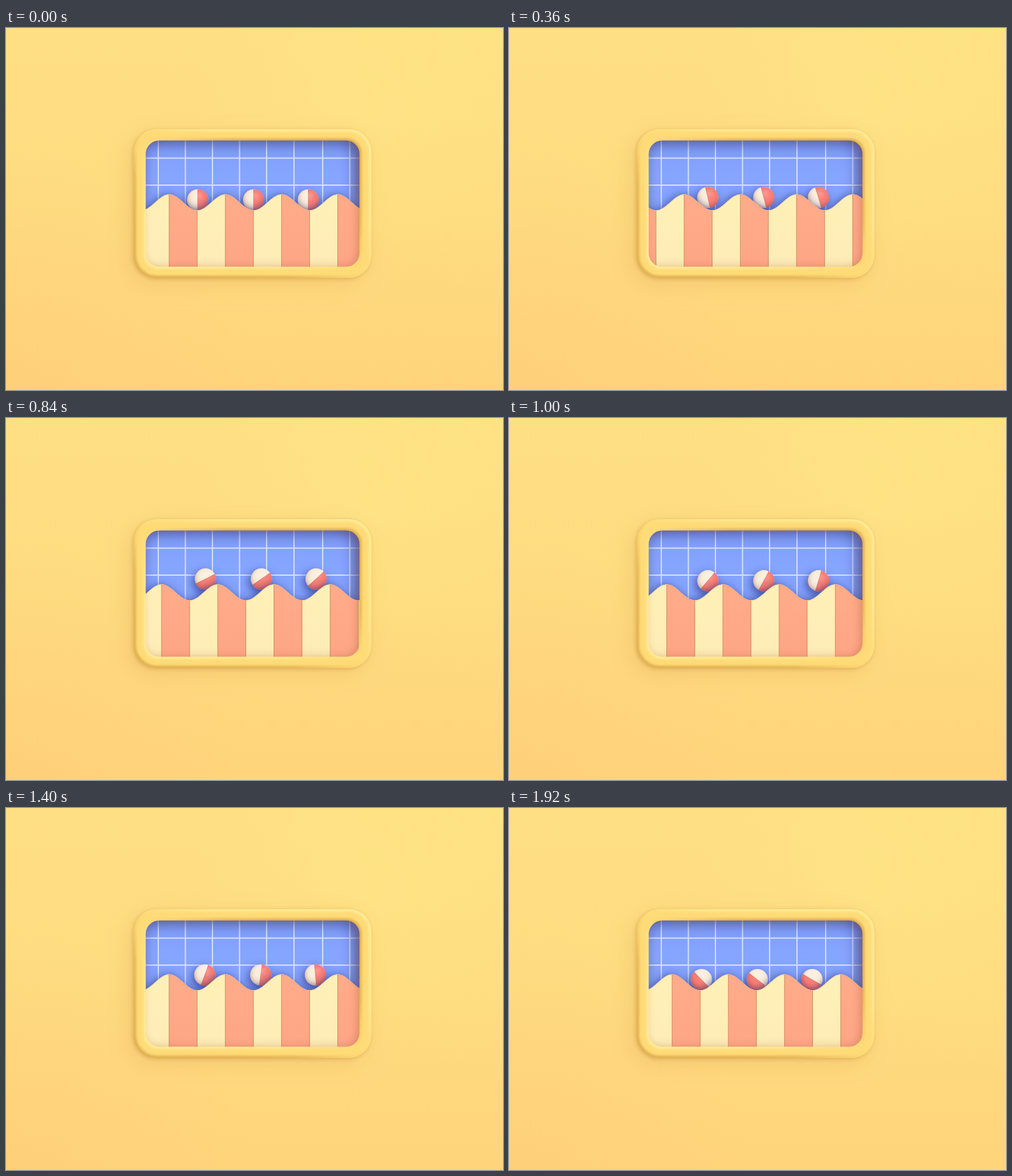
Write an HTML page with a canvas that moves like this. It is 780 px wide and 569 px high and loops after 1.96 s.

```html
<!DOCTYPE html>
<html lang="en">
<head>
<meta charset="utf-8">
<title>Rolling balls on a wave</title>
<style>
html, body { margin: 0; width: 100%; height: 100%; overflow: hidden; background: #fedb80; }
canvas { display: block; }
</style>
</head>
<body>
<canvas id="stage" width="780" height="569"></canvas>
<script>
const W = 780, H = 569, LOOP = 1960, STEP = 40;
const PERIOD = 88.2, CREST = 256, MID = 274, AMP = 12.5, R = 16.7;
const CONTACT_R = 15.2;
const BOX = { x: 218.5, y: 176, w: 337, h: 200, r: 22 };
const TUBE = 17.7;
const BALL_GAP = [0, 87.8, 173.6];
const GRID_X = [239, 281.5, 324, 366.5, 409, 452, 497, 539.5];
const GRID_Y = [204.5, 247];

// [time, value]
const SHIFT = [[0, 0], [320, 20], [650, -12.8], [720, -12.8], [1430, 0], [1920, -PERIOD]];
const BALL_X = [[0, 300.8], [360, 312], [560, 310.7], [840, 313], [1160, 311], [1400, 312], [1640, 316], [1920, 302]];
const SPIN = [[0, 0], [360, -13], [560, 60], [840, 63], [1160, 17], [1400, 20], [1640, 98], [1920, 136]];
const LAG = [[0, 0], [560, 3], [1160, 14], [1920, 8]];

const stage = document.getElementById('stage');
const ctx = stage.getContext('2d');

function segment(keys, t) {
  let i = 0;
  while (i < keys.length - 2 && t > keys[i + 1][0]) i++;
  const u = (t - keys[i][0]) / (keys[i + 1][0] - keys[i][0]);
  return [i, Math.min(1, Math.max(0, u))];
}

function eased(keys, t) {
  const [i, u] = segment(keys, t);
  return keys[i][1] + (keys[i + 1][1] - keys[i][1]) * (1 - Math.cos(Math.PI * u)) / 2;
}

// Cubic Hermite curve through the keys
function smooth(keys, t) {
  const [i, u] = segment(keys, t);
  const [a, b] = [keys[i], keys[i + 1]];
  const slope = j => {
    const p = keys[j - 1], n = keys[j + 1];
    return p && n ? (n[1] - p[1]) / (n[0] - p[0]) : 0;
  };
  const d = b[0] - a[0], u2 = u * u, u3 = u2 * u;
  return a[1] * (2 * u3 - 3 * u2 + 1) + b[1] * (3 * u2 - 2 * u3) +
    d * (slope(i) * (u3 - 2 * u2 + u) + slope(i + 1) * (u3 - u2));
}

const surface = (x, shift) => MID - AMP * Math.cos((x - CREST - shift) * 2 * Math.PI / PERIOD);

// Height at which a ball touches the wave, sinking a little at the crest
function restY(x, shift) {
  let y = Infinity;
  for (let d = -15; d <= 15; d += 0.5) {
    y = Math.min(y, surface(x + d, shift) - Math.sqrt(CONTACT_R ** 2 - d * d));
  }
  return y - 0.8 + (270 - y) * 0.08;
}

function roundBox(c, grow) {
  const gy = grow * 0.94;
  c.roundRect(BOX.x - grow, BOX.y - gy, BOX.w + 2 * grow, BOX.h + 2 * gy,
    BOX.r + grow * 0.75);
}

function linear(c, x0, y0, x1, y1, ...stops) {
  const g = c.createLinearGradient(x0, y0, x1, y1);
  stops.forEach((s, i) => g.addColorStop(i / (stops.length - 1), s));
  return g;
}

function setShadow(c, color, blur, dx, dy) {
  c.shadowColor = color;
  c.shadowBlur = blur;
  c.shadowOffsetX = dx;
  c.shadowOffsetY = dy;
}

function layer(draw) {
  const cv = document.createElement('canvas');
  cv.width = W;
  cv.height = H;
  draw(cv.getContext('2d'));
  return cv;
}

function clipBox(c) {
  c.save();
  c.beginPath();
  roundBox(c, 0);
  c.clip();
}

// Shade the rim casts into the opening
function rimShade(c, ...shadow) {
  c.save();
  setShadow(c, ...shadow);
  c.fillStyle = '#f5cd68';
  c.beginPath();
  c.rect(150, 110, 480, 340);
  roundBox(c, 0.5);
  c.fill('evenodd');
  c.restore();
}

const wall = layer(c => {
  c.fillStyle = linear(c, 0, 0, 0, H, '#ffdf84', '#fedc80', '#ffd47b');
  c.fillRect(0, 0, W, H);
  const glow = (x, y, r, rgb, a) => {
    const g = c.createRadialGradient(x, y, 0, x, y, r);
    g.addColorStop(0, `rgba(${rgb},${a})`);
    g.addColorStop(1, `rgba(${rgb},0)`);
    c.fillStyle = g;
    c.fillRect(0, 0, W, H);
  };
  glow(780, 0, 420, '253,230,128', 0.5);
  glow(560, 90, 260, '255,230,137', 0.5);
  glow(0, 569, 380, '255,203,122', 0.5);

  c.fillStyle = '#fdd978';
  for (const s of [['rgba(200,135,50,0.2)', 36, -9, 9], ['rgba(175,110,35,0.38)', 6, -1.5, 1.5]]) {
    setShadow(c, ...s);
    c.beginPath();
    roundBox(c, TUBE);
    c.fill();
  }
  setShadow(c, 'transparent', 0, 0, 0);

  clipBox(c);
  c.fillStyle = linear(c, 0, 176, 0, 290, '#7f9dfa', '#86a5ff', '#83a2fd');
  c.fillRect(210, 170, 355, 215);
  c.strokeStyle = '#d6e0fd';
  c.lineWidth = 1.9;
  c.beginPath();
  for (const x of GRID_X) { c.moveTo(x, 170); c.lineTo(x, 380); }
  for (const y of GRID_Y) { c.moveTo(210, y); c.lineTo(565, y); }
  c.stroke();
  rimShade(c, 'rgba(48,52,120,0.75)', 24, -7, 4);
  c.restore();
});

const tube = layer(c => {
  clipBox(c);
  rimShade(c, 'rgba(165,85,55,0.4)', 14, -4, 0);
  c.restore();

  // Nested outlines give the rim its round profile, lit from the upper right
  c.lineWidth = 1.5;
  for (let d = 0; d <= TUBE; d += 0.75) {
    const n = -Math.cos(Math.PI * d / TUBE);
    const edge = n * Math.abs(n) ** 3;
    const tone = side => {
      const k = edge * side;
      return k > 0
        ? `rgb(255,${219 + 16 * k},${120 + 30 * k})`
        : `rgb(${255 + 30 * k},${219 + 42 * k},${120 + 40 * k})`;
    };
    c.strokeStyle = linear(c, 492, 108, 283, 444,
      ...[1, 0.95, 0.8, 0, -0.8, -0.95, -1].map(tone));
    c.beginPath();
    roundBox(c, d);
    c.stroke();
  }
});

function wavePath(shift) {
  ctx.beginPath();
  ctx.moveTo(212, 385);
  for (let x = 212; x <= 562; x += 1) ctx.lineTo(x, surface(x, shift));
  ctx.lineTo(562, 385);
  ctx.closePath();
}

function drawWave(shift) {
  ctx.save();
  setShadow(ctx, 'rgba(42,52,135,0.7)', 14, -3, 1);
  ctx.fillStyle = '#feefb8';
  wavePath(shift);
  ctx.fill();
  ctx.restore();

  ctx.save();
  wavePath(shift);
  ctx.clip();
  ctx.fillStyle = linear(ctx, 0, 260, 0, 376, '#fff0b8', '#fdecb6');
  ctx.fillRect(210, 255, 355, 125);
  const half = PERIOD / 2;
  for (let k = -2; k < 6; k++) {
    const x = CREST + shift + k * PERIOD;
    ctx.fillStyle = linear(ctx, 0, 260, 0, 376, '#ffab89', '#fea686');
    ctx.fillRect(x, 255, half, 125);
    ctx.fillStyle = 'rgba(190,125,80,0.75)';
    ctx.fillRect(x - 0.5, 255, 1, 125);
    ctx.fillRect(x + half - 0.5, 255, 1, 125);
  }
  ctx.strokeStyle = 'rgba(235,165,115,0.45)';
  ctx.lineWidth = 1.6;
  wavePath(shift);
  ctx.stroke();
  ctx.restore();
}

function drawBall(x, y, angle) {
  ctx.save();
  ctx.translate(x, y);
  ctx.save();
  setShadow(ctx, 'rgba(42,50,130,0.7)', 14, -3, 5);
  ctx.fillStyle = '#faeedb';
  ctx.beginPath();
  ctx.arc(0, 0, R, 0, 2 * Math.PI);
  ctx.fill();
  ctx.restore();

  ctx.save();
  ctx.rotate(angle * Math.PI / 180);
  ctx.fillStyle = '#fb7a70';
  ctx.beginPath();
  ctx.arc(0, 0, R, -Math.PI / 2, Math.PI / 2);
  ctx.fill();
  ctx.fillStyle = 'rgba(175,75,65,0.55)';
  ctx.fillRect(-0.4, -R, 0.8, 2 * R);
  ctx.restore();

  const g = ctx.createRadialGradient(3, -7, 1, 1, -2, R + 3);
  g.addColorStop(0, 'rgba(255,255,255,0.22)');
  g.addColorStop(0.45, 'rgba(255,245,235,0.04)');
  g.addColorStop(0.75, 'rgba(130,60,60,0.1)');
  g.addColorStop(1, 'rgba(110,45,60,0.36)');
  ctx.fillStyle = g;
  ctx.beginPath();
  ctx.arc(0, 0, R, 0, 2 * Math.PI);
  ctx.fill();
  ctx.restore();
}

function render(t) {
  const shift = eased(SHIFT, t);
  const x = smooth(BALL_X, t);
  const y = restY(x, shift);
  const angle = smooth(SPIN, t);
  const lag = eased(LAG, t);

  ctx.drawImage(wall, 0, 0);
  clipBox(ctx);
  BALL_GAP.forEach((gap, i) => drawBall(x + gap, y, angle - i * lag));
  drawWave(shift);
  ctx.restore();
  ctx.drawImage(tube, 0, 0);
}

function tick() {
  const t = performance.now() % LOOP;
  render(Math.min(Math.floor(t / STEP) * STEP, 1920));
  requestAnimationFrame(tick);
}
tick();
</script>
</body>
</html>
```
